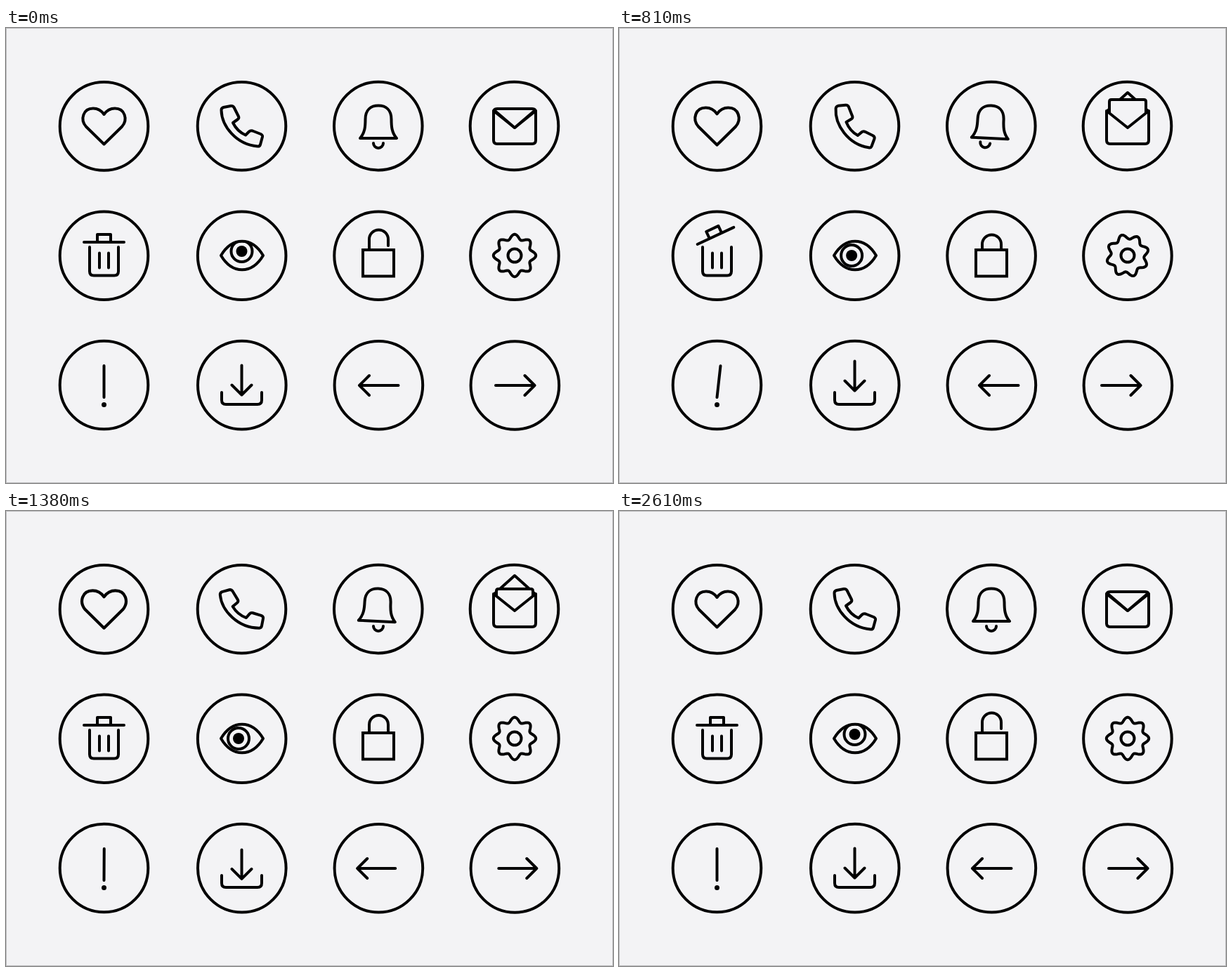
Recreate the animation shown at these times as an HTML page. Size 864 by 648 pixels, loop 2.7 s.

```html
<!DOCTYPE html>
<html lang="en">
<head>
<meta charset="utf-8">
<title>Icon set</title>
<style>
  html, body { margin: 0; width: 100%; height: 100%; overflow: hidden; background: #f3f3f5; }
  svg { display: block; width: 864px; height: 648px; }
  .line { fill: none; stroke: #000; stroke-width: 4; stroke-linecap: round; stroke-linejoin: round; }
  .paper { fill: #f3f3f5; }
  .dot { fill: #000; stroke: none; }
  .square { stroke-linejoin: miter; }
</style>
</head>
<body>
<svg viewBox="0 0 864 648">
  <rect x=".5" y=".5" width="863" height="647" fill="#f3f3f5" stroke="#bdbdbf"/>
  <g class="line">
    <g id="rings"></g>

    <path id="heart" d="M139.5 165.5L114 140.5C105 130 110 114.5 124 114.5C131 114.5 136 118 139.5 123C143 118 148 114.5 155 114.5C169 114.5 174 130 165 140.5Z"/>

    <path id="phone" d="M306.5 117Q306.5 114 309.5 113L320 111Q323 110.5 324.5 113L331 126Q332 128.5 330 130L323 135C327 143 333 149 341 152.5L346 147.5Q348 145.5 351 146.5L362.5 151Q365.5 152.5 365 155L362 166Q361 169 358 168.5C328 166 307 140 306.5 117Z"/>

    <path id="bell" d="M504 157C511 149 511.5 140 511.5 130C511.5 117 519 110.5 530 110.5C541 110.5 548.5 117 548.5 130C548.5 140 549 149 556 157Z"/>
    <path id="clapper" d="M523 164a7 7 0 0 0 14 0"/>

    <path id="flapOpen"/>
    <path id="letter" class="paper" d="M698 140V105q0-3 3-3h46q3 0 3 3V140"/>
    <path class="paper" d="M694 118L724 142L754 118V160q0 5-5 5H699q-5 0-5-5Z"/>
    <path id="flapShut" class="paper"/>

    <path d="M119 312V346.500q0 6 6 6h29q6 0 6-6V312M133 320.500V341.500M146 320.500V341.500"/>
    <path id="lid" d="M111 305H168M130 305V294H149V305"/>

    <clipPath id="lids"><path id="lensClip"/></clipPath>
    <g clip-path="url(#lids)">
      <g id="pupil"><circle r="15"/><circle r="8" class="dot"/></g>
    </g>
    <path id="lens"/>

    <path id="shackle" d="M517 318V301a13.5 13.5 0 0 1 27 0V310"/>
    <rect class="paper square" x="508" y="316" width="44" height="37.5"/>

    <path id="gear"/>
    <circle cx="724" cy="324" r="9.5"/>

    <g id="alert">
      <circle cx="139.5" cy="508.5" r="62.8"/>
      <path id="stem" d="M139.5 481V526"/>
      <circle cx="139.5" cy="536.5" r="3.5" class="dot"/>
    </g>

    <path d="M307 519V530q0 6 6 6H358q6 0 6-6V519"/>
    <path id="arrows"/>
  </g>
</svg>
<script>
const LOOP = 2700, STEP = 30, REST = 1860;
const $ = id => document.getElementById(id);
const set = (id, d) => $(id).setAttribute('d', d);
const move = (id, transform) => $(id).setAttribute('transform', transform);
const turn = (id, angle, x, y) => move(id, `rotate(${angle} ${x} ${y})`);
const zoom = (id, s, x, y) => move(id, `translate(${x} ${y}) scale(${s}) translate(${-x} ${-y})`);

let t = 0;
const part = (a, b) => Math.min(1, Math.max(0, (t - a) / (b - a)));
const ramp = (a, b) => { const u = part(a, b); return u * u * (3 - 2 * u); };
const hold = (a, b, c, d) => ramp(a, b) - ramp(c, d);   // rise a-b, fall c-d
const bump = (a, peak, b) => hold(a, peak, peak, b);
const swing = (a, b, cycles = 1) => Math.sin(2 * Math.PI * cycles * part(a, b));

function lens(open) {
  const top = 324 - 27 * open, low = 324 + 27 * open;
  return `M306 324C322 ${top} 350 ${top} 366 324C350 ${low} 322 ${low} 306 324Z`;
}

// Arrow along direction (dx, dy), with tail and tip measured from the centre.
function arrow(cx, cy, dx, dy, tail, tip) {
  const p = (along, side) => `${cx + dx * along - dy * side} ${cy + dy * along + dx * side}`;
  return `M${p(tail, 0)}L${p(tip, 0)}M${p(tip - 14, -14)}L${p(tip, 0)}L${p(tip - 14, 14)}`;
}

function gearPath() {
  const pts = [];
  for (let i = 0; i < 120; i++) {
    const a = i * Math.PI / 60, r = 26.8 + 3.4 * Math.cos(8 * a);
    pts.push(`${724 + r * Math.sin(a)} ${324 - r * Math.cos(a)}`);
  }
  return 'M' + pts.join('L') + 'Z';
}

function drawRings() {
  let rings = '';
  for (let row = 0; row < 3; row++) {
    [139.5, 335.5, 529.8, 723.5].forEach((x, col) => {
      if (row === 2 && col === 0) return;   // the alert ring moves on its own
      const skew = .15 * col;
      rings += `<circle cx="${x + row * skew}" cy="${139.9 + 184.3 * row + (row - 1) * skew}" r="62.8"/>`;
    });
  }
  $('rings').innerHTML = rings;
}

function draw() {
  const settle = 1 - ramp(1560, REST);

  const beat = .02 + .115 * Math.cos(2 * Math.PI * (t - 580) / 1020);
  zoom('heart', 1 + beat * ramp(0, 300) * settle, 139.5, 140);
  turn('phone', 18 * bump(0, 300, 540) + 5 * swing(540, 1560), 335.5, 140);
  turn('bell', 15.5 * swing(150, 690) + 6 * swing(690, 2310) * settle, 530, 110);
  turn('clapper', 14 * swing(120, 1240, 2) * (1 - ramp(540, 1240)), 530, 110);

  const apex = 142 - 50 * hold(0, 440, 1400, 1760), shut = apex > 118;
  set('flapOpen', shut ? '' : `M694 119L724 ${apex}L754 119`);
  set('flapShut', shut ? `M694 120Q694 115 699 115H749Q754 115 754 120L752 118L724 ${apex}L696 118Z` : '');
  move('letter', `translate(0 ${19 - 19 * hold(300, 530, 1230, 1540)})`);

  turn('lid', -25 * hold(0, 440, 870, 1240), 118, 305);
  move('shackle', `translate(0 ${7 * hold(0, 240, 1230, 1530) + 3 * bump(180, 300, 540)
    + 3 * bump(990, 1170, 1350) - 3 * bump(1380, 1560, REST)})`);
  turn('gear', -180 * ramp(80, 1380), 724, 324);

  const now = t;
  t %= 1020;                                // the blink comes twice
  const eye = lens(1 - .8 * bump(390, 570, 750));
  t = now;
  set('lens', eye);
  set('lensClip', eye);
  move('pupil', `translate(${335.5 - 4.5 * hold(540, 840, 1560, REST)} ${318 + 6 * hold(0, 300, 1560, REST)})`);

  zoom('alert', 1 + .08 * bump(60, 300, 480) - .05 * bump(420, 540, 780), 139.5, 508.5);
  turn('stem', -7 * swing(340, 1720, 2), 139.5, 526);

  const push = hold(0, 300, 540, 700) + .55 * bump(930, 1170, 1560);
  const pull = bump(600, 810, 1050);
  const tail = 17.5 * push - 10 * pull - 28, tip = 11.5 * push - 10 * pull + 27.5;
  set('arrows', arrow(530.5, 509, -1, 0, tail, tip) + arrow(725, 509, 1, 0, tail, tip)
    + arrow(335.5, 501, 0, 1, 8 * push - 6 * pull - 20.5, 5.5 * push - 6 * pull + 21.5));
}

drawRings();
set('gear', gearPath());

const start = performance.now();
function tick() {
  const time = (performance.now() - start) % LOOP;
  t = Math.min(REST, Math.floor(time / STEP) * STEP);
  draw();
  requestAnimationFrame(tick);
}
tick();
</script>
</body>
</html>
```
